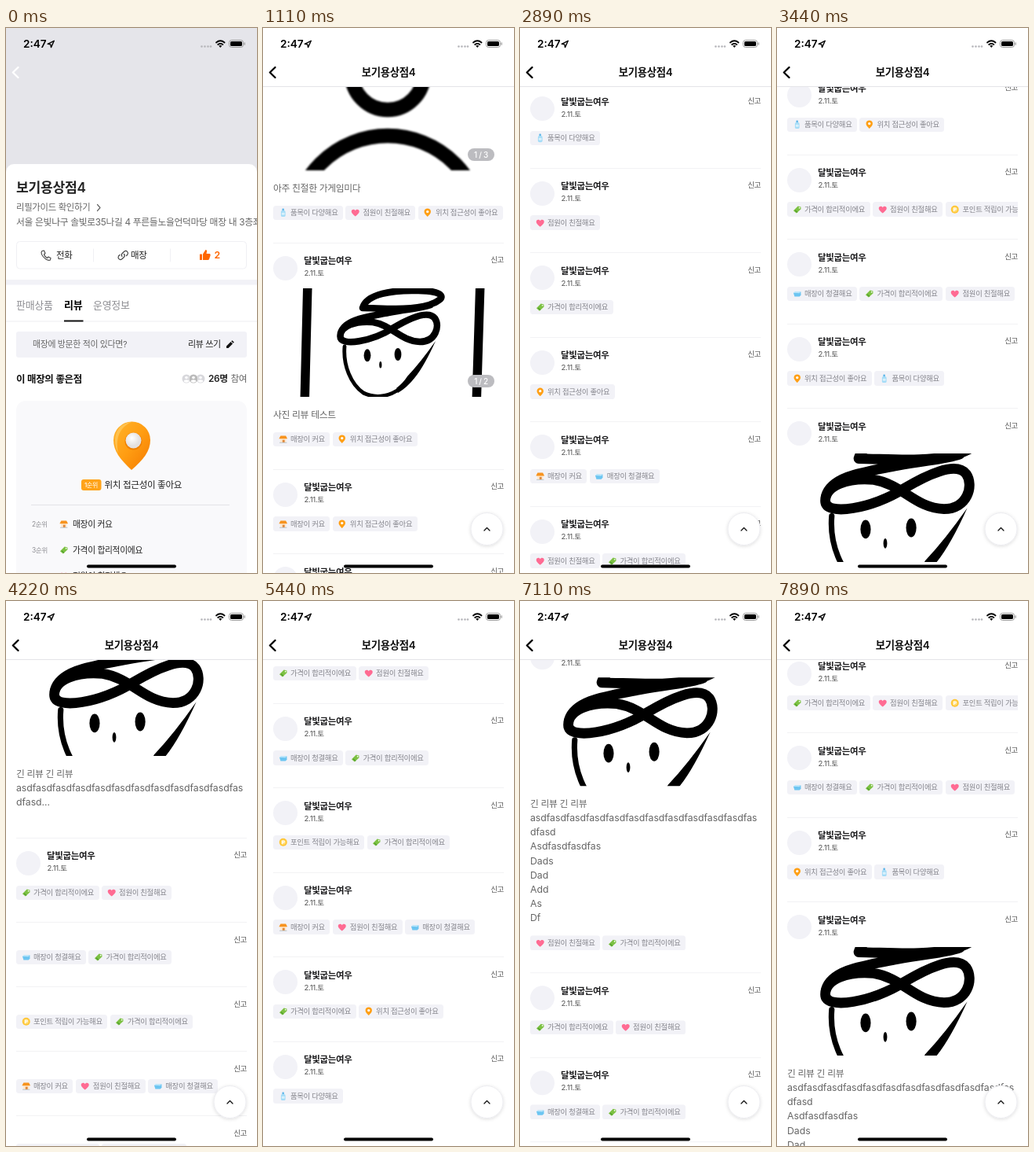
Write an HTML page that moves like this. It is 320 px wide and 693 px high and loops after 8000 ms.

```html
<!DOCTYPE html>
<html lang="ko">
<head>
<meta charset="utf-8">
<style>
html, body { margin: 0; width: 100%; height: 100%; overflow: hidden; background: #fff; }
body { font-family: Inter, "Noto Sans CJK KR", "Noto Sans CJK JP", sans-serif; letter-spacing: -.02em; }
#stage { position: relative; width: 320px; height: 693px; overflow: hidden; }
#stage svg { display: block; }
#page, #stage > svg, .list, .card, .card > * { position: absolute; left: 0; top: 0; }
.card { width: 320px; }
.card > * { line-height: 20px; white-space: nowrap; }
.line { left: 13px; width: 294px; height: 1px; background: #f2f2f4; }
.avatar { left: 13px; top: 17px; width: 31px; height: 31px; border-radius: 50%; background: #f2f2f7; }
.name { left: 52px; top: 13.5px; font-size: 11.5px; font-weight: 600; color: #1c1c1e; }
.date { left: 52.5px; top: 29.5px; font-size: 9.6px; color: #555; }
.report { left: auto; right: 13px; top: 12.5px; font-size: 9.5px; color: #555; }
.text { left: 13px; font-size: 11.8px; color: #666; }
.latin { font-size: 12.3px; letter-spacing: -.004em; }
.photo { left: 13px; top: 58px; }
.tags { left: 13px; width: 294px; display: flex; gap: 3.5px; overflow: hidden; }
.tag { flex: none; display: flex; align-items: center; gap: 4px; height: 18.5px; padding: 0 6.5px 0 6.5px;
  border-radius: 3.5px; background: #f2f2f7; color: #85858c; font-size: 9.4px; }
</style>
</head>
<body>
<div id="stage"></div>
<script>
const TITLE = '보기용상점4', USER = '달빛굽는여우';

const svg = (w, h, body, box = `0 0 ${w} ${h}`, attrs = '') =>
  `<svg width="${w}" height="${h}" viewBox="${box}" fill="none" ${attrs}>${body}</svg>`;
const rect = (x, y, w, h, fill, r = 0, more = '') =>
  `<rect x="${x}" y="${y}" width="${w}" height="${h}" rx="${r}" fill="${fill}" ${more}/>`;
const fill = (d, color) => `<path d="${d}" fill="${color}"/>`;
const line = (d, color, w = 1) =>
  `<path d="${d}" stroke="${color}" stroke-width="${w}" stroke-linecap="round" stroke-linejoin="round"/>`;
const disc = (x, y, r, color, ry = r) => `<ellipse cx="${x}" cy="${y}" rx="${r}" ry="${ry}" fill="${color}"/>`;
const label = (x, y, size, color, text, weight = 400, more = '') =>
  `<text x="${x}" y="${y + size * .36}" font-size="${size}" font-weight="${weight}" fill="${color}" ${more}>${text}</text>`;

// Review tags: label and 12 x 12 icon
const TAGS = {
  b: ['품목이 다양해요', rect(4.6, .5, 2.6, 3, '#5fb7ea', 1) + rect(3, 3, 6, 8.6, '#a5dcf7', 2) + rect(4, 6, 4, 3, '#d9f1fc', 1)],
  h: ['점원이 친절해요', fill('M6 11C2 8 .6 6 .8 4 1.2 1.4 4.6 1 6 3.4 7.4 1 10.8 1.4 11.2 4 11.4 6 10 8 6 11Z', '#ff6b93')],
  p: ['위치 접근성이 좋아요', fill('M6 11.6C3 8.6 1.6 6.8 1.6 4.8A4.4 4.4 0 0 1 10.4 4.8C10.4 6.8 9 8.6 6 11.6Z', '#ff9f14') + disc(6, 4.8, 1.7, '#fff')],
  s: ['매장이 커요', rect(2, 5, 8, 5.5, '#ffe9cf') + fill('M2.5 1.5H9.5L11.6 5.5H.4Z', '#f7931e') + rect(5, 7, 3, 3.5, '#e08a3c') + line('M1.5 10.7H10.5', '#b9c4c9')],
  c: ['가격이 합리적이에요', fill('M1 7.5L7 1.5 10.8 2.5 11 5.5 5 11Z', '#7cc142') + line('M3.5 7.5L6 9.5', '#4c9a2a', 1.2) + disc(9, 3.8, .9, '#fff')],
  m: ['포인트 적립이 가능해요', disc(6, 6, 5.2, '#ffc533') + disc(6, 6, 3.4, '#ffdb70') + line('M4.8 8V4.2H6.5A1 1 0 0 1 6.5 6.4H5', '#fff', 1.1)],
  w: ['매장이 청결해요', fill('M1 5L10.8 3.5 11 8 9 10H2.5Z', '#6cc5f1') + fill('M1 5L3 3 10.8 3.5 9 5.5Z', '#b9e5fb')]
};
const icon = (key, attrs) => svg(11.5, 11.5, TAGS[key][1], '0 0 12 12', attrs);

// Review photos
const ring = (cy, r) => `<circle cx="146" cy="${cy}" r="${r}" stroke="#000" stroke-width="18.5"/>`;
const person = svg(294, 138, ring(15, 46) + ring(215, 121), undefined, 'style="filter:blur(.8px)"');
const face =
  line('M57 320L53 480M277 320L272 480', '#000', 11.5) +
  line('M127 355C132 337 165 332 198 333C232 333 236 343 212 351C186 359 150 355 127 355Z' +
    'M98.5 391C98.5 378 118 371 140 373C165 377 175 397 200 398C220 398 226 378 219 368C210 357 185 369 165 381C140 397 98.5 405 98.5 391Z' +
    'M99 387C104 369 135 366 160 361S200 356 214 351', '#000', 8.6) +
  line('M104 404C102 428 112 452 128 463C142 470 158 468 171 460', '#000', 4.8) +
  fill('M220 397Q206 428 194 443Q184 456 172 463L170 457Q179 450 184 442Q201 424 220 397Z', '#000') +
  disc(133, 415.3, 4.4, '#000', 8) + disc(172, 414, 4.4, '#000', 8) + disc(149.8, 427.3, 1.6, '#000', 4.3);
const drawing = svg(294, 138, face, '13 330 294 138');
const closeUp = svg(294, 138, face, '65.9 350.6 197.3 92.6');
const counter = n => svg(34, 16, rect(0, 0, 34, 16, '#bcbcc0', 8) +
  label(17, 8, 10, '#fff', `1 / ${n}`, 500, 'text-anchor="middle"'), undefined, 'style="position:absolute;left:248px;top:110px"');

const run = 'asdf'.repeat(11) + 'as';
const CARDS = [
  ['bhp', ['아주 친절한 가게임미다'], person + counter(3)],
  ['sp', ['사진 리뷰 테스트'], drawing + counter(2)],
  ['sp'], ['s'],
  ['', ['테스트 문구 작성']],
  ['sp', ['Test']],
  ['s'],
  ['s', ['매장이 청결해요 누른경우']],
  ['w', ['7번 태그 업로드']],
  ['m'], ['b'], ['h'], ['c'], ['p'], ['sw'], ['hc'],
  ['bp'], ['chm'], ['wch'], ['pb'],
  ['hc', ['긴 리뷰 긴 리뷰', run, 'dfasd', 'Asdfasdfasdfas', 'Dads', 'Dad', 'Add', 'As', 'Df'], closeUp],
  ['ch'], ['wc'], ['mc'], ['shw'], ['cp'], ['b']
];
const LONG = 20, LIST_TOP = 854.5;

// While loading, the long text is cut and the last cards have no author yet.
function buildList(loading) {
  let top = LIST_TOP, html = '';
  CARDS.forEach(([tags, lines = [], photo], i) => {
    const cut = loading && i === LONG, bare = loading && i > LONG + 1;
    if (cut) { lines = [...lines.slice(0, 2), 'dfasd...']; tags = ''; }
    let body = `<div class="line"></div><div class="report">신고</div>`;
    if (!bare) body += `<div class="avatar"></div><div class="name">${USER}</div><div class="date">2.11.토</div>`;
    if (photo) body += `<div class="photo">${photo}</div>`;
    let y = photo ? 219 : 71.5;
    lines.forEach((text, k) => {
      if (k) y += 18.15;
      body += `<div class="text ${/^[a-z]/i.test(text) ? 'latin' : ''}" style="top:${y - 10}px">${text}</div>`;
    });
    if (tags) {
      y = lines.length ? y + 31.5 : bare ? 44.5 : 70;
      body += `<div class="tags" style="top:${y - 9.25}px">` +
        [...tags].map(t => `<div class="tag">${icon(t)}${TAGS[t][0]}</div>`).join('') + '</div>';
    }
    html += `<div class="card" style="top:${top}px">${body}</div>`;
    top += y + (cut ? 44.5 : tags ? 37.5 : 31.5);
  });
  return `<div class="list">${html}</div>`;
}

function buildHero() {
  const dark = '#222', grey = '#666', pale = '#f2f2f7', orange = '#f60';
  const ranks = [...'schmwb'].map((key, i) => {
    const y = 631 + i * 33;
    return label(33, y, 8.5, '#8e8e93', `${i + 2}순위`) + icon(key, `x="68" y="${y - 6}"`) + label(85, y, 10.8, dark, TAGS[key][0], 500);
  }).join('');
  const people = [230, 248, 239].map(x => disc(x, 446, 6, '#fff') + disc(x, 446, 5.5, x === 239 ? '#bbb' : '#d8d8dc') +
    disc(x, 444.5, 1.8, '#fff') + disc(x, 449, 3.2, '#fff', 1.7)).join('');
  return svg(320, 860,
    `<defs><linearGradient id="gold" x2="1" y2="1"><stop stop-color="#ffb52e"/><stop offset=".5" stop-color="#ff9d12"/><stop offset="1" stop-color="#f47a00"/></linearGradient>
     <radialGradient id="pearl" cx=".4" cy=".35"><stop stop-color="#fff"/><stop offset="1" stop-color="#e3e0e0"/></radialGradient></defs>` +
    rect(0, 0, 320, 200, '#e5e5ea') + rect(0, 173, 320, 700, '#fff', 10) +
    label(13, 203, 17.2, dark, TITLE, 600) +
    label(13, 228, 11.4, grey, '리필가이드 확인하기') + line('M116.5 224.5L120 228.5 116.5 232.5', grey, 1.2) +
    label(13, 247, 11.8, grey, '서울 은빛나구 솔빛로35나길 4 푸른들노을언덕마당 매장 내 3층좌측') +
    rect(13.5, 271.5, 293, 34.5, '#fff', 4, 'stroke="#f0f0f4"') + line('M111.5 281V297M209.5 281V297', '#f0f0f4') +
    line('M46 283.5L48.5 283 50 286.5 48.5 288Q49.5 291 52.5 292.5L54 291 57 292.5 56.5 295Q54 296 51 294Q45.5 290 45 285.5Z', '#444', 1.1) +
    label(64, 289, 11.5, dark, '전화', 500) +
    line('M148 290.5A3 3 0 0 1 148.3 286.5L151 284A2.9 2.9 0 0 1 155 288L153.5 289.5M150.5 287.5A3 3 0 0 1 150.3 291.5L147.5 294A2.9 2.9 0 0 1 143.5 290L145 288.5', '#444', 1.2) +
    label(159, 289, 11.5, dark, '매장', 500) +
    rect(247, 287.5, 3, 7.5, orange, .5) + fill('M251 287.5L254.5 282Q256.5 282 256 284.5L255.5 287H259.5Q261 287.5 260.5 289.5L259 294Q258.5 295 257.5 295H251Z', orange) +
    label(265.5, 289, 12.3, orange, '2', 600) +
    rect(0, 320, 320, 6.5, pale) +
    label(13, 352.5, 13, '#8e8e93', '판매상품') + label(74, 352.5, 13, '#000', '리뷰', 600) + label(111, 352.5, 13, '#8e8e93', '운영정보') +
    rect(0, 372.5, 320, 1, '#eeeef2') + rect(74, 371.5, 24.5, 2, '#111') +
    rect(13, 386, 294, 33, pale, 3) + label(34, 402.5, 10.9, grey, '매장에 방문한 적이 있다면?') + label(232, 402.5, 11, dark, '리뷰 쓰기', 500) +
    fill('M281 407V404.5L286.5 399 289 401.5 283.5 407ZM287.2 398.3L288.4 397.2 290.8 399.6 289.7 400.8Z', '#111') +
    label(13, 446, 12.5, '#111', '이 매장의 좋은점', 600) + people +
    label(258, 446, 11.8, dark, '26명', 600) + label(286.5, 446, 11.6, grey, '참여') +
    rect(13, 474, 294, 358, '#f9f9fb', 12) +
    fill('M160 562C146 549 137 538 137 524A23.5 23.5 0 0 1 184 524C184 538 175 549 160 562Z', 'url(#gold)') +
    fill('M143 541C133 520 143 502 160 501C145 508 139 521 143 541Z', '#ffc24f') + disc(162.5, 525.5, 11, '#f08000') + disc(162.5, 524.5, 10, 'url(#pearl)') +
    rect(96, 574, 25.5, 14, '#ffa319', 3) + label(108.5, 581, 8, '#fff', '1순위', 500, 'text-anchor="middle"') +
    label(125.5, 581, 11.6, dark, TAGS.p[0], 500) + rect(32, 606, 253, 1, '#e3e3e8') + ranks, undefined, 'style="position:absolute"');
}

const back = color => line('M15.5 50L8.8 56.5 15.5 63', color, 2.3);
const status =
  label(22, 20.5, 13.6, '#000', '2:47', 600, 'letter-spacing="0"') + line('M53.2 20.3L61.3 16.3 57.5 24.6 56.8 20.9Z', '#000', 1.4) +
  [249.5, 253.5, 257.5, 261].map(x => disc(x, 23.5, 1.3, '#b5b5ba')).join('') +
  line('M268 18.5Q273.3 14 278.6 18.5M270.2 21Q273.3 18.6 276.4 21', '#000', 1.8) + fill('M271.2 22.6Q273.3 21.2 275.4 22.6L273.3 25Z', '#000') +
  rect(284.5, 15.5, 18, 9, 'none', 3, 'stroke="#999"') + rect(286, 17, 15, 6, '#000', 1.6) + rect(303.6, 18.2, 1.2, 3.6, '#999', .6) +
  rect(103, 682.5, 114, 4, '#000', 2);
const header = rect(0, 0, 320, 74, '#fff') + rect(0, 74, 320, 1, '#e4e4e8') + back('#000') +
  label(160, 56.5, 13.4, '#111', TITLE, 600, 'text-anchor="middle"');
const topButton = `<g style="filter:drop-shadow(0 1px 2px #0002)">${disc(285.5, 637, 21, '#fff')}</g>` +
  `<circle cx="285.5" cy="637" r="20.5" stroke="#ececf0"/>` + line('M282 639L285.5 635.5 289 639', '#111', 1.3);

const stage = document.getElementById('stage');
stage.innerHTML = `<div id="page">${buildHero()}${buildList(true)}${buildList(false)}</div>` +
  svg(320, 693, `<g id="backLight">${back('#fff')}</g><g id="header">${header}</g><g id="topButton">${topButton}</g>${status}`);
const [page, backLight, headerBar, upButton] =
  ['page', 'backLight', 'header', 'topButton'].map(id => document.getElementById(id));
const [loadingList, fullList] = page.querySelectorAll('.list');

// Scroll positions as [tick, y]; each stretch slows down like a flick.
const KEYS = [[0, 0], [5, 0], [10, 870], [18, 1566], [21, 1703], [23, 1703], [31, 2977], [38, 3459], [43, 3459],
  [43, 3592.3], [47, 3871], [52, 3871], [57, 3680], [60, 3425], [68, 3418], [71, 3078]];
const FPS = 9, TICKS = 72, LOADED = 44;
const decay = n => 1 - Math.exp(-.11 * n);

function scrollAt(n) {
  const next = Math.max(1, KEYS.findIndex(([tick]) => tick >= n));
  const [t0, y0] = KEYS[next - 1], [t1, y1] = KEYS[next];
  return y0 + (y1 - y0) * decay(n - t0) / decay(t1 - t0);
}

function draw(now) {
  const n = Math.floor((now + 5) * FPS / 1000) % TICKS;
  const y = scrollAt(n);
  page.style.transform = `translateY(${-y}px)`;
  loadingList.style.display = n < LOADED ? '' : 'none';
  fullList.style.display = n < LOADED ? 'none' : '';
  headerBar.style.opacity = Math.min(1, y / 100);
  backLight.style.opacity = y < 100 ? 1 : 0;
  upButton.style.display = y > 300 ? '' : 'none';
  requestAnimationFrame(draw);
}
draw(0);
</script>
</body>
</html>
```
